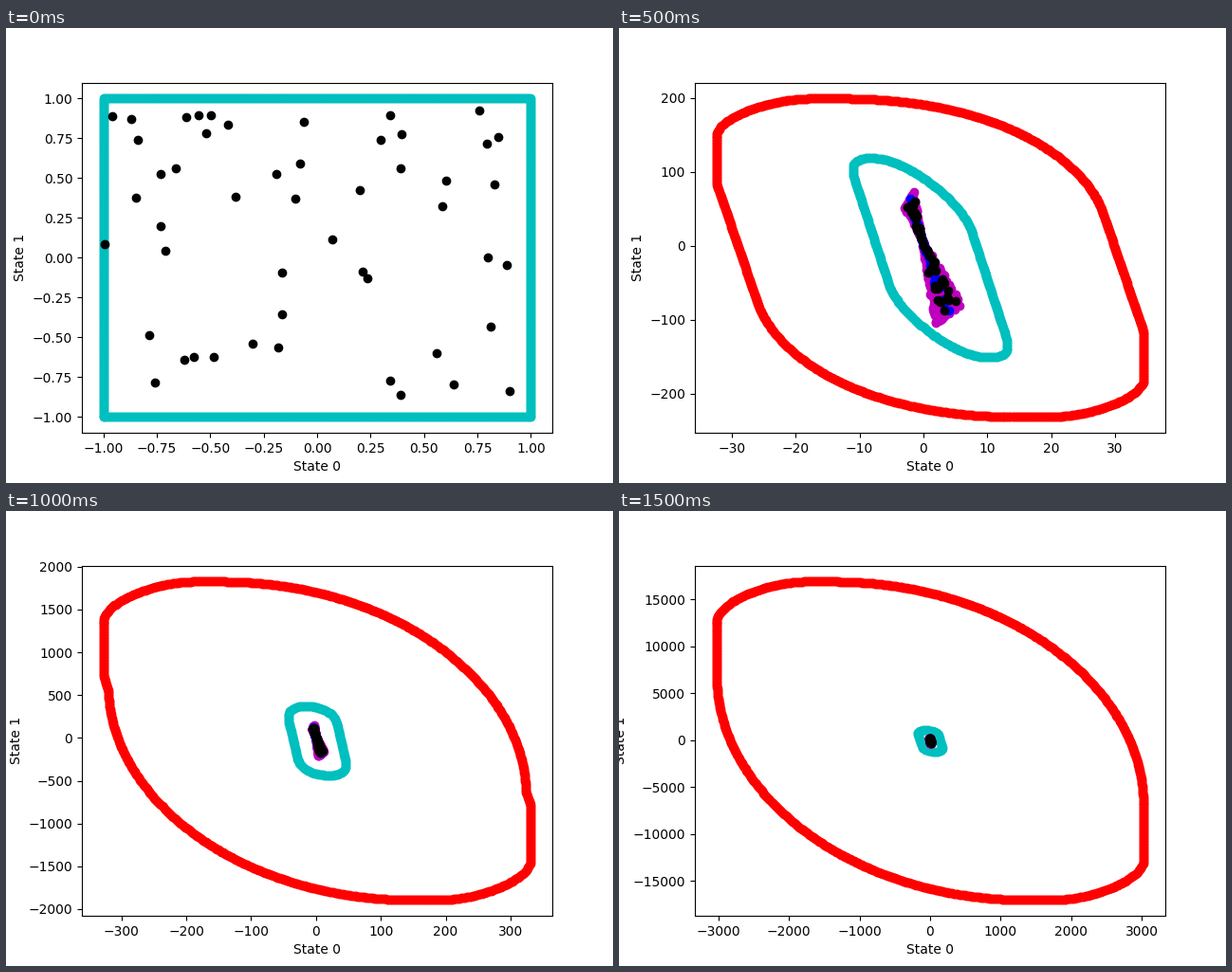
A matplotlib script for the animation above (1750 ms loop, 640x480 px).

```python
import numpy as np
import matplotlib.pyplot as plt
from matplotlib.animation import FuncAnimation

# View limits per step: x0, x1, y0, y1
VIEWS = [
    (-1.1, 1.1, -1.1, 1.1),
    (-9.18, 9.95, -81.1, 65.1),
    (-35.8, 37.9, -252.9, 220.4),
    (-117.2, 120.4, -716.9, 667.4),
    (-360.8, 364.3, -2081, 2014),
    (-1100, 1102, -6223, 6130),
    (-3336, 3336, -18717, 18616),
]
MARGIN = 1.1
HALF_PX = np.array([225.4, 168])

# Width and height of the inner set relative to the outer one
INNER_SIZE = [(1, 1), (.606, .768), (.36, .625), (.188, .395),
              (.135, .217), (.096, .118), (.057, .067)]

# Shapes in the unit square, y down: height where the left side ends,
# ends of the flat top, shoulder handles (x; x, y), shoulder, right corner
SLAB = np.array([-.957, -.90, -.85, -.28, .403, -.858, .474, -.654, .864])
LEAF = np.array([-.92, -.82, -.74, -.30, .420, -.550, .535, -.272, .83])
BARREL = np.array([-.746, -.504, -.406, .141, .598, -.81, .683, -.502, .621])
SHIELD = np.array([-.758, -.548, -.415, .319, .721, -.62, .808, -.282, .473])
LENS = np.array([-.74, -.57, -.459, .385, 1, -.312, 1, .402, .402])


def bezier(*pts):
    a, b, c, d = np.array(pts, float)
    t = np.linspace(0, 1, 40)[:, None]
    s = 1 - t
    return s**3 * a + 3 * s * s * t * b + 3 * s * t * t * c + t**3 * d


def half_outline(shape):
    side, t1, t2, h1, h2x, h2y, sx, sy, corner = shape
    rise = bezier((-1, side), (-1, (side - 1) / 2),
                  (.55 * t1 - .45, -1), (t1, -1))
    fall = bezier((t2, -1), (h1, -1), (h2x, h2y), (sx, sy))
    return np.vstack([rise, fall, [(1, corner)]])


def ring(half, size=(1, 1), step=1.5):
    """Close a half outline by point reflection and space dots evenly."""
    pts = np.vstack([half, -half, half[:1]]) * size
    lengths = np.hypot(*(np.diff(pts, axis=0) * HALF_PX).T)
    s = np.r_[0, np.cumsum(lengths)]
    t = np.arange(0, s[-1], step)
    return np.column_stack([np.interp(t, s, pts[:, k]) for k in (0, 1)])


def outer_shape(i):
    """The outer set starts as a barrel, then settles into a lens."""
    if i == 1:
        return BARREL
    return LENS + (SHIELD - LENS) * .35 ** (i - 2)


def inner_half(i):
    if i == 0:
        return np.array([(-1, 1), (-1, -1), (1, -1)])
    return half_outline(SLAB if i == 1 else LEAF if i < 4 else BARREL)


# The trajectories fan out from a waist into two triangles
rng = np.random.default_rng(12)
WAIST = np.array([-.15, 4.8])
UPPER = np.array([(-1.5, 25.7), (-.77, 36.8)]) - WAIST
LOWER = np.array([(.89, -53.4), (3.0, -39.6)]) - WAIST


def fan(n, power, lo=0, hi=1, upper=.28):
    up = rng.random(n)[:, None] < upper
    first, last = (np.where(up, UPPER[k], LOWER[k]) for k in (0, 1))
    reach = rng.random((n, 1)) ** power
    across = rng.uniform(lo, hi, (n, 1))
    return WAIST + reach * (first + across * (last - first))


start = rng.uniform(-1, 1, (50, 2))
clouds = [(fan(480, .6), "m"),
          (fan(50, 1.7, .35, .65, .4), "b"),
          (fan(50, .7, .1, .95, .36) * .95, "k")]

fig, ax = plt.subplots(figsize=(6.4, 4.8), dpi=100)


def dots(pts, color):
    ax.plot(pts[:, 0], pts[:, 1], "o", color=color, ms=6)


def draw(i):
    ax.clear()
    x0, x1, y0, y1 = VIEWS[i]
    centre = np.array([x0 + x1, y0 + y1]) / 2
    scale = np.array([x1 - x0, y0 - y1]) / 2 / MARGIN

    if i > 0:
        dots(centre + scale * ring(half_outline(outer_shape(i))), "r")
    dots(centre + scale * ring(inner_half(i), INNER_SIZE[i]), "c")
    if i == 0:
        dots(start, "k")
    else:
        for pts, color in clouds:
            dots(pts * i, color)  # the cloud grows by the same amount each step

    ax.set(xlim=(x0, x1), ylim=(y0, y1), xlabel="State 0", ylabel="State 1")
    return ax.lines


anim = FuncAnimation(fig, draw, frames=len(VIEWS), interval=250,
                     repeat=True, repeat_delay=0, blit=False)
plt.show()
```
